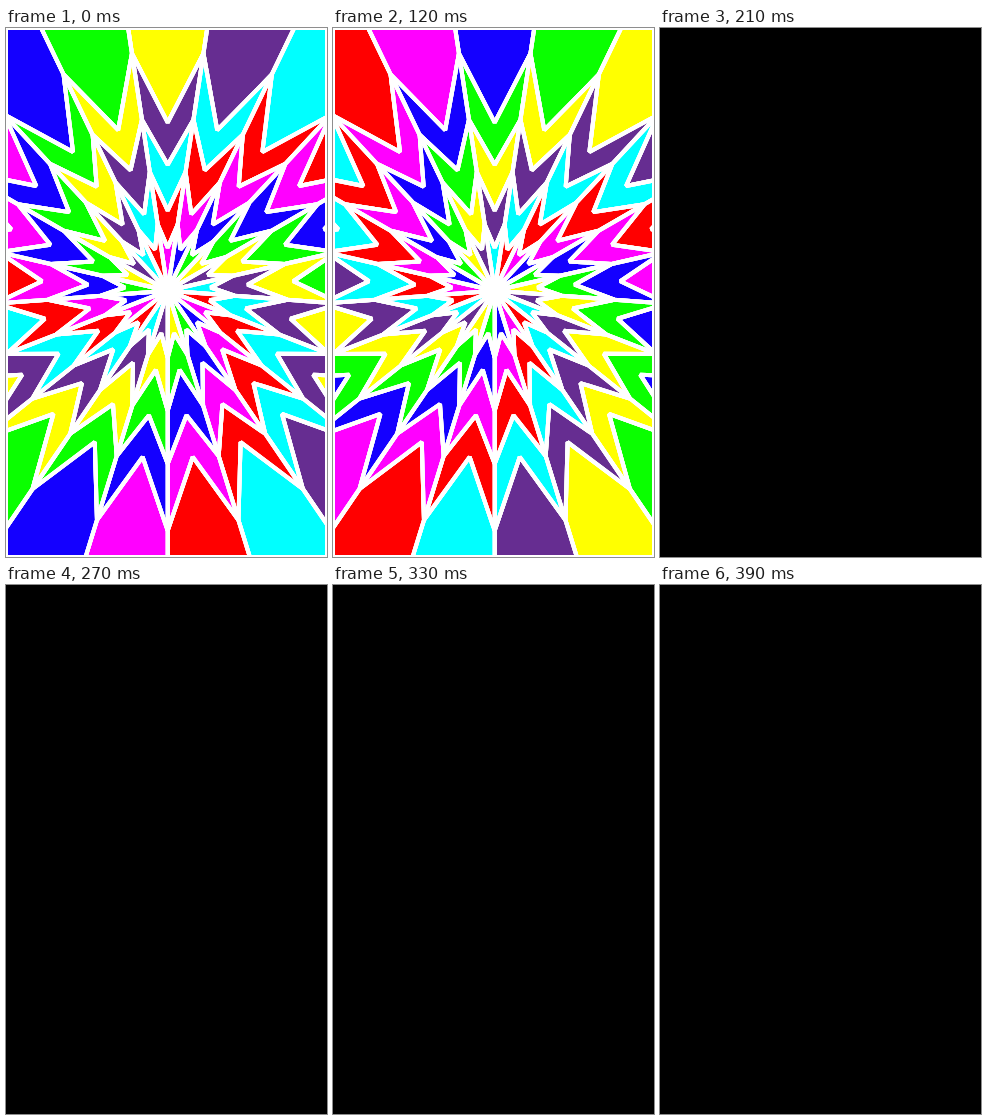
An HTML page that plays this animation: 321x529 px, repeating every 420 ms.

```html
<!DOCTYPE html>
<html lang="en">
<head>
<meta charset="utf-8">
<title>Strobe burst</title>
<style>
  html, body { margin: 0; width: 100%; height: 100%; overflow: hidden; background: #000; }
  svg { display: block; width: 321px; height: 529px; }
</style>
</head>
<body>
<svg viewBox="0 0 321 529">
  <g id="burst">
    <g id="cells" stroke="#fff" stroke-width="4" stroke-linejoin="bevel"></g>
    <rect x="1" y="1" width="319" height="527" fill="none" stroke="#fff" stroke-width="2"/>
  </g>
</svg>
<script>
  const SPOKES = 21, STEP = 30, CX = 161.7, CY = 262.7;
  const COLORS = ['#1400ff', '#0aff00', '#ffff00', '#662d91', '#00ffff', '#ff0000', '#ff00ff'];
  // zigzag radii, outside in: on the spokes and halfway between them
  const PEAK = [520, 240, 173, 120, 67, 0];
  const VALLEY = [520, 168, 126, 80, 43, 0];

  const burst = document.getElementById('burst');
  const group = document.getElementById('cells');
  const cells = [];

  function point(radius, turn) {
    const a = turn * 2 * Math.PI / SPOKES;
    return (CX + radius * Math.sin(a)).toFixed(2) + ',' + (CY - radius * Math.cos(a)).toFixed(2);
  }

  function addCell(col, ring) {
    const el = document.createElementNS('http://www.w3.org/2000/svg', 'polygon');
    const l = col - 0.5, r = col + 0.5, next = ring + 1;
    el.setAttribute('points', [
      point(PEAK[ring], l), point(VALLEY[ring], col), point(PEAK[ring], r),
      point(PEAK[next], r), point(VALLEY[next], col), point(PEAK[next], l)
    ].join(' '));
    group.appendChild(el);
    cells.push({ el, hue: col + ring + 2 });
  }

  // all fills lie under one another's outlines: paint cells, then the web on top
  for (let ring = 0; ring < PEAK.length - 1; ring++)
    for (let col = 0; col < SPOKES; col++) addCell(col, ring);
  const web = group.cloneNode(true);
  web.removeAttribute('id');
  web.setAttribute('fill', 'none');
  group.after(web);

  let shown = -1;
  function draw(ms) {
    const n = COLORS.length;
    const tick = Math.floor(ms / STEP) % (2 * n);
    if (tick === shown) return;
    shown = tick;
    const lit = tick % 2 === 0;
    burst.setAttribute('visibility', lit ? 'visible' : 'hidden');
    if (!lit) return;
    for (const c of cells) c.el.setAttribute('fill', COLORS[(c.hue + n - tick / 2) % n]);
  }

  const start = performance.now();
  function loop() {
    draw(performance.now() - start);
    requestAnimationFrame(loop);
  }
  draw(0);
  requestAnimationFrame(loop);
</script>
</body>
</html>
```
